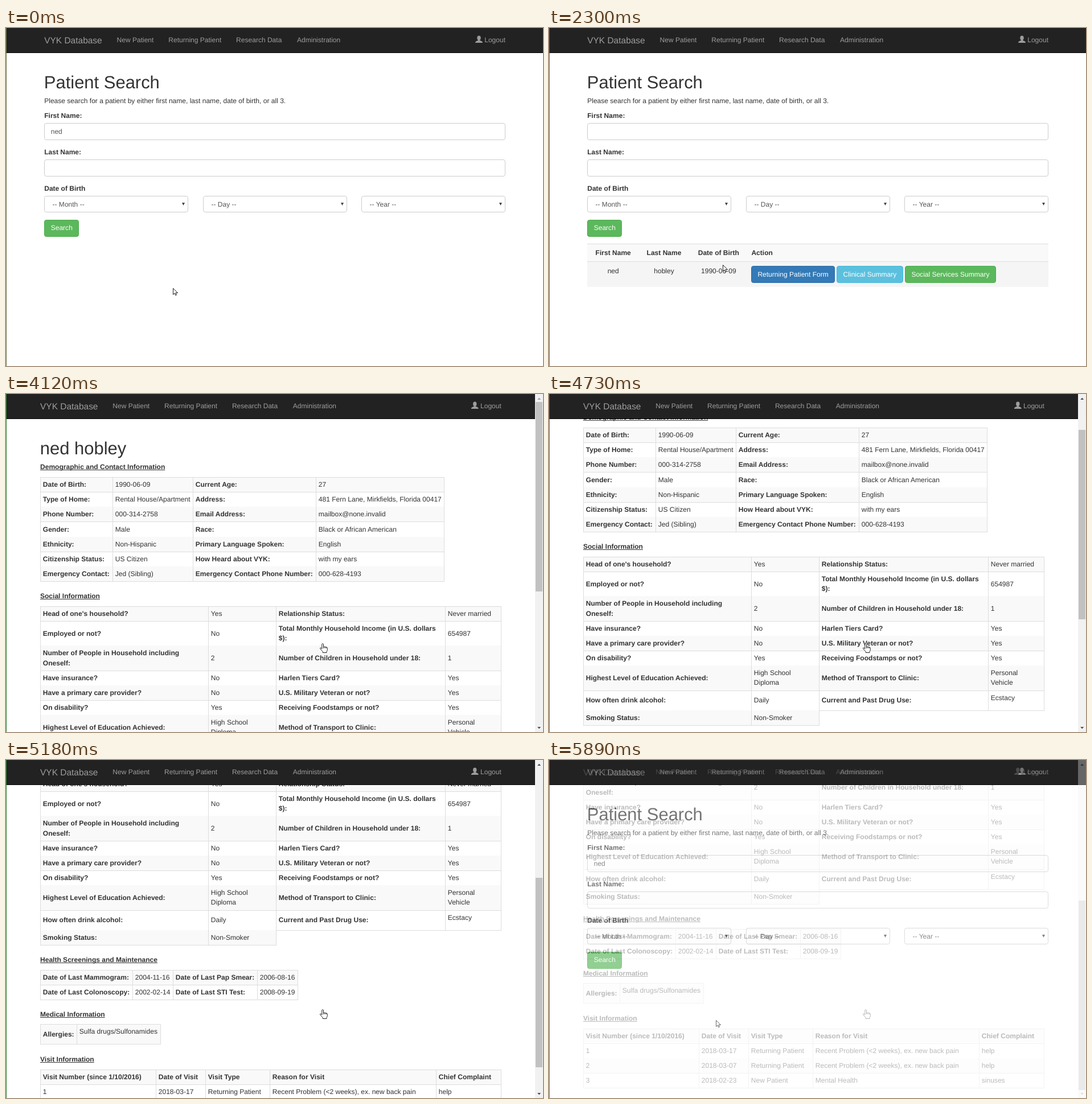
An HTML page with a canvas for the animation above (5960 ms loop, 943 px wide and 594 px high).

```html
<!DOCTYPE html>
<html lang="en">
<head>
<meta charset="utf-8">
<title>Patient search</title>
<style>
html, body { margin: 0; width: 100%; height: 100%; overflow: hidden; background: #fff; }
canvas { display: block; }
</style>
</head>
<body>
<canvas id="stage" width="943" height="594"></canvas>
<script>
const W = 943, H = 594, LOOP = 5960, MAX_SCROLL = 416;
const ctx = document.getElementById('stage').getContext('2d');
const FACE = '"Liberation Sans", Arial, sans-serif';
const BODY = 12.04, DARK = '#333', GREY = '#9d9d9d';

// button colours: [fill, border, hover fill, hover border, pressed fill, pressed border]
const GREEN = ['#5cb85c', '#4cae4c', '#449d44', '#398439', '#398439', '#255625'];
const BLUE = ['#337ab7', '#2e6da4', '#286090', '#204d74', '#204d74', '#122b40'];
const CYAN = ['#5bc0de', '#46b8da', '#31b0d5', '#269abc', '#269abc', '#1b6d85'];

const SEARCH = { x: 67, y: 337, w: 61, h: 30, label: 'Search', tx: 78.7, ty: 355, look: GREEN };
const ACTIONS = [
  { x: 355, y: 418, w: 147, h: 30, label: 'Returning Patient Form', tx: 366.4, ty: 437, look: BLUE },
  { x: 505, y: 418, w: 117, h: 30, label: 'Clinical Summary', tx: 516.6, ty: 437, look: CYAN },
  { x: 625, y: 418, w: 160, h: 30, label: 'Social Services Summary', tx: 636.4, ty: 437, look: GREEN }
];

// pointer path: time, x, y
const PATH = [
  [0, 293, 457], [120, 280, 450], [340, 192, 405], [560, 112, 364], [760, 100, 355],
  [1420, 100, 355], [1500, 118, 361], [1650, 260, 386], [1790, 382, 395], [1880, 290, 393],
  [2050, 88, 390], [2120, 122, 396], [2300, 309, 416], [2440, 498, 429], [2560, 640, 434],
  [2630, 650, 435], [2690, 612, 436], [2850, 578, 435], [3080, 562, 437], [3300, 555, 438]
];

// stretches of steady redraws: first, last, count
const BEATS = [[50, 620, 10], [690, 1120, 7], [1480, 3300, 30], [4540, 5180, 11], [5180, 5390, 4]];

// wheel turns: start time, distance
const NOTCHES = [[4465, 86], [4720, 86], [4850, 86], [4975, 86], [5190, 72]];

function snap(t) {
  for (const [a, b, n] of BEATS) {
    const step = (b - a) / (n - 1);
    if (t >= a && t < b) return a + Math.floor((t - a) / step + 0.1) * step;
  }
  return t;
}

function pointerAt(t) {
  let i = 1;
  while (i < PATH.length - 1 && PATH[i][0] < t) i++;
  const [t0, x0, y0] = PATH[i - 1], [t1, x1, y1] = PATH[i];
  const k = Math.min(1, (t - t0) / (t1 - t0));
  return { x: x0 + (x1 - x0) * k, y: y0 + (y1 - y0) * k };
}

function scrollAt(t) {
  let sum = 0;
  for (const [start, size] of NOTCHES) {
    const k = Math.max(0, Math.min(1, (t - start) / 200));
    sum += size * k * k * (3 - 2 * k);
  }
  return Math.round(sum);
}

function rect(x, y, w, h, color) {
  ctx.fillStyle = color;
  ctx.fillRect(x, y, w, h);
}

function text(s, x, y, color = DARK, size = BODY, bold = false, align = 'left') {
  ctx.font = (bold ? 'bold ' : '') + size + 'px ' + FACE;
  ctx.textAlign = align;
  ctx.fillStyle = color;
  ctx.fillText(s, x, y);
}

function box(x, y, w, h, fill, border, r = 3.4) {
  ctx.beginPath();
  ctx.roundRect(x + 0.5, y + 0.5, w - 1, h - 1, r);
  ctx.fillStyle = fill;
  ctx.fill();
  ctx.lineWidth = 1;
  ctx.strokeStyle = border;
  ctx.stroke();
}

function triangle(x, y, w, h, color) {
  ctx.beginPath();
  ctx.moveTo(x - w / 2, y);
  ctx.lineTo(x + w / 2, y);
  ctx.lineTo(x, y + h);
  ctx.fillStyle = color;
  ctx.fill();
}

const inside = (b, p) => p.x >= b.x && p.x < b.x + b.w && p.y >= b.y && p.y < b.y + b.h;

function button(b, state) {
  box(b.x, b.y, b.w, b.h, b.look[state * 2], b.look[state * 2 + 1]);
  text(b.label, b.tx, b.ty, '#fff');
}

function navbar(width, dx) {
  rect(0, 0, width, 44, '#222');
  rect(0, 43, width, 1, '#080808');
  text('VYK Database', 67.2 + dx, 26.5, GREY, 15.48);
  text('New Patient', 194.5 + dx, 25, GREY);
  text('Returning Patient', 285.3 + dx, 25, GREY);
  text('Research Data', 404.1 + dx, 25, GREY);
  text('Administration', 511 + dx, 25, GREY);
  text('Logout', 877 + dx, 25, GREY, BODY, false, 'right');
  ctx.save();
  ctx.translate(830.5 + dx, 0);
  ctx.beginPath();
  ctx.ellipse(0, 17.6, 3.2, 4, 0, 0, 7);
  ctx.rect(-1.5, 20, 3, 3);
  ctx.moveTo(-6.3, 26);
  ctx.lineTo(-6.3, 24.6);
  ctx.quadraticCurveTo(-5, 23, -1.5, 21.8);
  ctx.lineTo(1.5, 21.8);
  ctx.quadraticCurveTo(5, 23, 6.3, 24.6);
  ctx.lineTo(6.3, 26);
  ctx.fill();
  ctx.restore();
}

const ARROW = new Path2D('M0 0V11L2.6 8.6L4.2 12.3L6 11.6L4.4 8H8Z');
const HAND = new Path2D('M-.7 1Q.7-.9 2 1V6Q3.4 4.9 4.6 6.2Q6 5.2 7 6.8Q8.6 6 8.8 8V11' +
  'Q8.6 13 7.5 14V16H.8V14.3Q-1.5 12-3.8 9Q-4.4 7.3-2.7 7.5L-.7 9.4Z');

function pointer(p, hand) {
  const shape = hand ? HAND : ARROW;
  ctx.save();
  ctx.translate(Math.round(p.x) + 0.5, Math.round(p.y) + 0.5);
  ctx.fillStyle = '#fff';
  ctx.fill(shape);
  ctx.lineWidth = 1;
  ctx.lineJoin = 'round';
  ctx.strokeStyle = '#222';
  ctx.stroke(shape);
  if (hand) {
    ctx.beginPath();
    for (const x of [2, 4.6, 7]) {
      ctx.moveTo(x, 6);
      ctx.lineTo(x, 8.5);
    }
    ctx.stroke();
  }
  ctx.restore();
}

function searchPage(t) {
  const p = pointerAt(t), found = t >= 1120;
  rect(0, 0, W, H, '#fff');
  navbar(W, 0);
  text('Patient Search', 66.8, 105.5, DARK, 30.96);
  text('Please search for a patient by either first name, last name, date of birth, or all 3.', 67.2, 132);
  text('First Name:', 67.2, 158, DARK, BODY, true);
  box(67, 167, 810, 30, '#fff', '#ccc');
  if (!found) text('ned', 78.7, 186, '#555');
  text('Last Name:', 67.2, 221.5, DARK, BODY, true);
  box(67, 231, 810, 30, '#fff', '#ccc');
  text('Date of Birth', 67.2, 286, DARK, BODY, true);
  ['Month', 'Day', 'Year'].forEach((name, i) => {
    const x = Math.round(67 + i * 278.5);
    box(x, 295, 253, 29, '#fff', '#ccc');
    text('-- ' + name + ' --', x + 14.5, 313.5, '#555');
    triangle(x + 244.5, 307, 5, 5, '#444');
  });

  const onSearch = inside(SEARCH, p);
  button(SEARCH, onSearch ? 1 : 0);
  if (t >= 880 && !found) {
    ctx.lineWidth = 1.5;
    ctx.strokeStyle = '#5b9ddb';
    ctx.beginPath();
    ctx.roundRect(67.2, 336.8, 61.2, 30.2, 2);
    ctx.stroke();
  }

  let hand = onSearch;
  if (found) {
    rect(67, 379, 810, 32, '#f9f9f9');
    if (p.y >= 411) rect(67, 411, 810, 44, '#f5f5f5');
    rect(67, 379, 810, 1, '#ddd');
    rect(67, 410, 810, 1, '#ddd');
    [['First Name', 'ned', 112.7], ['Last Name', 'hobley', 202], ['Date of Birth', '1990-06-09', 297.8]]
      .forEach(([head, value, x]) => {
        text(head, x, 399, DARK, BODY, true, 'center');
        text(value, x, 431, DARK, BODY, false, 'center');
      });
    text('Action', 355.4, 399, DARK, BODY, true);
    for (const b of ACTIONS) {
      const over = inside(b, p);
      hand = hand || over;
      button(b, over ? (t >= 3420 && t < 3620 ? 2 : 1) : 0);
    }
    if (t >= 2980) {
      box(-2, 574, 316, 22, '#f2f2f2', '#c3c3c3', 3);
      text('clinic.invalid/patients/7/summary', 4, 588, '#5a5a5a', 10.5);
    }
  }
  rect(0, 0, 1, H, t < 690 ? '#6b6f45' : '#2f7d32');
  pointer(p, hand);
}

function title(s, y) {
  text(s, 60, y, DARK, BODY, true);
  rect(60, y + 1, ctx.measureText(s).width, 1, DARK);
}

// '|' breaks a line, '^' lifts the text, heads: whole first row is bold
function table(xs, top, rows, heads) {
  let y = top;
  rows.forEach((row, r) => {
    const cells = row.cells || row;
    const h = row.h || 26.15;
    const y0 = Math.floor(y), y1 = Math.floor(y + h);
    const right = xs[cells.length];
    if (r % 2 === 0) rect(xs[0], y0, right - xs[0], y1 - y0, '#f9f9f9');
    if (r === 0) rect(xs[0], y0, right - xs[0] + 1, 1, '#ddd');
    rect(xs[0], y1, right - xs[0] + 1, 1, '#ddd');
    for (let i = 0; i <= cells.length; i++) rect(xs[i], y0, 1, y1 - y0 + 1, '#ddd');
    cells.forEach((cell, i) => {
      const lift = cell[0] === '^' ? 4.5 : 0;
      const lines = cell.replace('^', '').split('|');
      const bold = heads ? r === 0 : i % 2 === 0;
      lines.forEach((line, n) => {
        const mid = y + h / 2 - lift + (n - (lines.length - 1) / 2) * 17.2;
        text(line, xs[i] + 4.8, Math.floor(mid + 4), DARK, BODY, bold);
      });
    });
    y += h;
  });
}

const tall = (...cells) => ({ cells, h: 43.35 });
const listed = (...cells) => ({ cells, h: 35 });

const PERSON = [
  ['Date of Birth:', '1990-06-09', 'Current Age:', '27'],
  ['Type of Home:', 'Rental House/Apartment', 'Address:', '481 Fern Lane, Mirkfields, Florida 00417'],
  ['Phone Number:', '000-314-2758', 'Email Address:', 'mailbox@none.invalid'],
  ['Gender:', 'Male', 'Race:', 'Black or African American'],
  ['Ethnicity:', 'Non-Hispanic', 'Primary Language Spoken:', 'English'],
  ['Citizenship Status:', 'US Citizen', 'How Heard about VYK:', 'with my ears'],
  ['Emergency Contact:', 'Jed (Sibling)', 'Emergency Contact Phone Number:', '000-628-4193']
];

const SOCIAL = [
  ["Head of one's household?", 'Yes', 'Relationship Status:', 'Never married'],
  tall('Employed or not?', 'No', 'Total Monthly Household Income (in U.S. dollars|$):', '654987'),
  tall('Number of People in Household including|Oneself:', '2', 'Number of Children in Household under 18:', '1'),
  ['Have insurance?', 'No', 'Harlen Tiers Card?', 'Yes'],
  ['Have a primary care provider?', 'No', 'U.S. Military Veteran or not?', 'Yes'],
  ['On disability?', 'Yes', 'Receiving Foodstamps or not?', 'Yes'],
  tall('Highest Level of Education Achieved:', 'High School|Diploma', 'Method of Transport to Clinic:', 'Personal|Vehicle'),
  listed('How often drink alcohol:', 'Daily', 'Current and Past Drug Use:', '^Ecstacy'),
  ['Smoking Status:', 'Non-Smoker']
];

const SCREENINGS = [
  ['Date of Last Mammogram:', '2004-11-16', 'Date of Last Pap Smear:', '2006-08-16'],
  ['Date of Last Colonoscopy:', '2002-02-14', 'Date of Last STI Test:', '2008-09-19']
];

const BACK_PAIN = 'Recent Problem (<2 weeks), ex. new back pain';
const VISITS = [
  ['Visit Number (since 1/10/2016)', 'Date of Visit', 'Visit Type', 'Reason for Visit', 'Chief Complaint'],
  ['1', '2018-03-17', 'Returning Patient', BACK_PAIN, 'help'],
  ['2', '2018-03-07', 'Returning Patient', BACK_PAIN, 'help'],
  ['3', '2018-02-23', 'New Patient', 'Mental Health', 'sinuses']
];

function scrollbar(pos) {
  const scale = 566 / (H + MAX_SCROLL);
  rect(929, 0, 14, H, '#f1f1f1');
  rect(930, Math.round(14 + pos * scale), 12, Math.round(H * scale), '#c1c1c1');
  triangle(936.2, 10, 6, -3.5, pos > 0 ? '#505050' : '#a3a3a3');
  triangle(936.2, 585, 6, 3.5, pos < MAX_SCROLL ? '#505050' : '#a3a3a3');
}

function summaryPage(t) {
  const pos = scrollAt(t);
  rect(0, 0, W, H, '#fff');
  ctx.save();
  ctx.translate(0, -pos);
  text('ned hobley', 59.8, 105.5, DARK, 30.96);
  title('Demographic and Contact Information', 132);
  table([60, 187, 328, 544, 769], 146.5, PERSON);
  title('Social Information', 359);
  table([60, 355, 474, 771, 869], 373.4, SOCIAL);
  title('Health Screenings and Maintenance', 699);
  table([60, 222, 293, 441, 512], 713.4, SCREENINGS);
  title('Medical Information', 795);
  table([60, 124, 271], 808.8, [listed('Allergies:', '^Sulfa drugs/Sulfonamides')]);
  title('Visit Information', 874);
  table([60, 263, 350, 463, 755, 869], 888.1, VISITS, true);
  ctx.restore();
  navbar(929, -7.2);
  scrollbar(pos);
  rect(0, 0, 1, H, '#2f7d32');
  pointer(pointerAt(t), true);
}

// copy of the opening view, blended in before the loop restarts
const opening = document.createElement('canvas');
opening.width = W;
opening.height = H;

function fade(alpha) {
  ctx.globalAlpha = alpha;
  ctx.drawImage(opening, 0, 0);
  ctx.globalAlpha = 1;
}

function draw(now) {
  const t = snap(now % LOOP);
  if (t < 3950) {
    searchPage(t);
  } else {
    summaryPage(t);
    if (t >= 5820) fade(t < 5890 ? 1 / 3 : 2 / 3);
  }
}

ctx.textRendering = 'geometricPrecision';
searchPage(0);
opening.getContext('2d').drawImage(ctx.canvas, 0, 0);

const begin = performance.now();
function tick() {
  draw(performance.now() - begin);
  requestAnimationFrame(tick);
}
tick();
</script>
</body>
</html>
```
